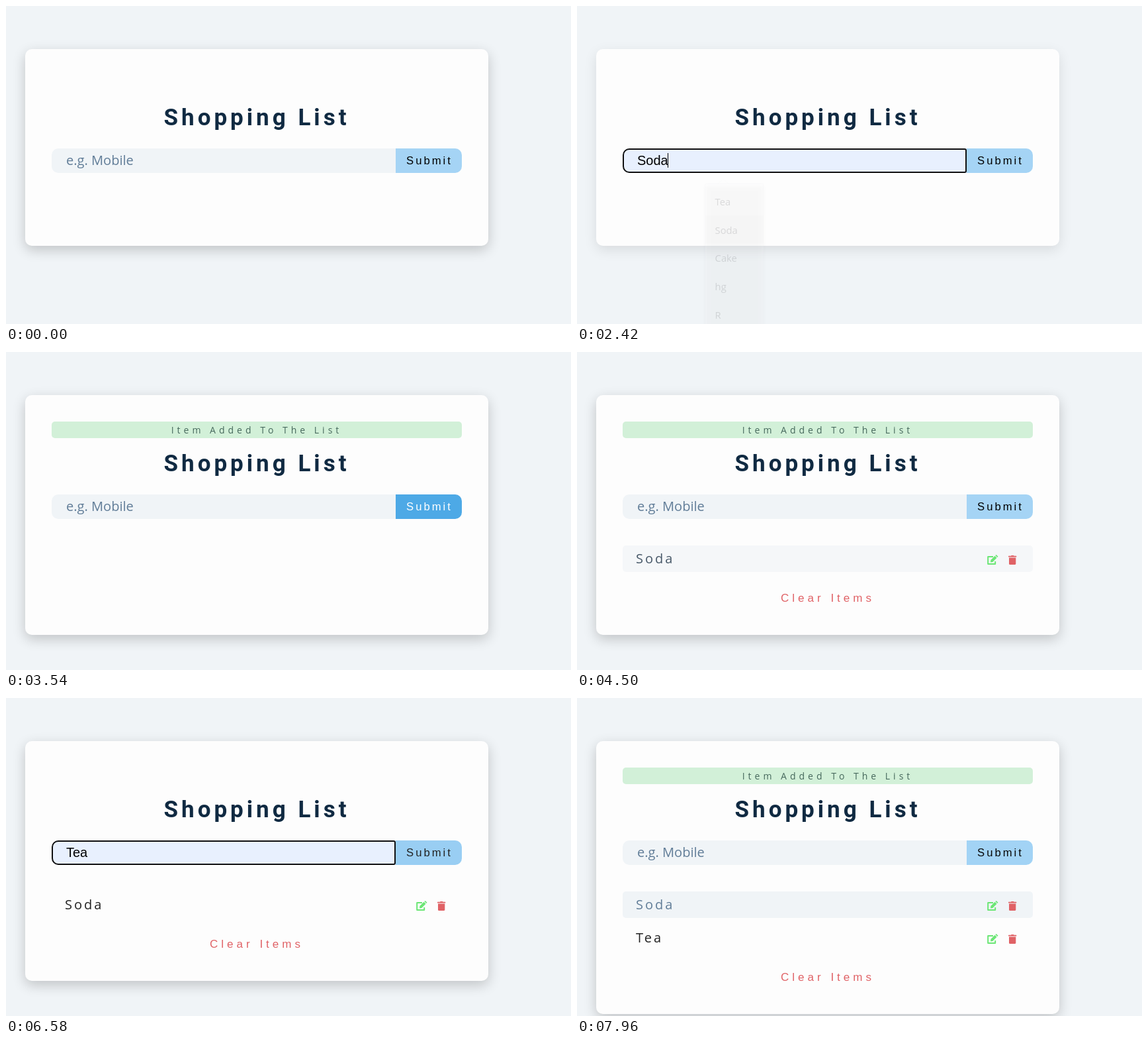
Write an HTML page with a canvas that moves like this. It is 854x480 px and loops after 8 s.

```html
<!DOCTYPE html>
<html lang="en">
<head>
<meta charset="utf-8">
<title>Shopping List</title>
<style>
  html, body { margin: 0; width: 100%; height: 100%; overflow: hidden; background: #f0f4f7; }
  canvas { display: block; width: 854px; height: 480px; }
</style>
</head>
<body>
<canvas id="stage" width="854" height="480"></canvas>
<script>
const ctx = document.getElementById('stage').getContext('2d');
const LOOP = 8000;
const OPEN = '"Open Sans", "Noto Sans", sans-serif';
const ARIAL = '"Liberation Sans", Arial, sans-serif';
const MID = 379;
const PALE = '#f0f4f7', WHITE = '#fdfdfd', INK = '#102a42', RED = '#e06266', GREEN = '#6be675';

// One entry per use of the input field
const rounds = [
  { focus: 460, open: 710, picks: [[1250, 0], [1670, 1]], pick: 2000, close: 2290, blur: 3440, submit: 3540 },
  { focus: 4790, open: 4920, picks: [[5330, 0]], pick: 5790, close: 6080, blur: 7000, submit: 7210 }
];
const options = ['Tea', 'Soda', 'Cake', 'hg', 'R'];

const clamp = v => Math.max(0, Math.min(1, v));
const ramp = (t, from, span) => clamp((t - from) / span);
const within = (t, a, b) => t >= a && t < b;
const mix = (a, b, p) => `rgb(${a.map((v, i) => Math.round(v + (b[i] - v) * p))})`;

// Linear hover transition that flips at each of the given times
function hover(t, start, flips, span = 300) {
  return flips.reduce((value, at, i) => {
    if (t < at) return value;
    const p = ramp(t, at, span);
    return (start + i) % 2 ? 1 - p : p;
  }, start);
}

function box(x, y, w, h, r, fill) {
  ctx.beginPath();
  ctx.roundRect(x, y, w, h, r);
  ctx.fillStyle = fill;
  ctx.fill();
}

function text(str, x, y, font, color, spacing = 0, align = 'left') {
  ctx.font = font;
  ctx.letterSpacing = spacing + 'px';
  ctx.textAlign = align;
  ctx.fillStyle = color;
  ctx.fillText(str, x, y);
}

function shadow(color, blur, dy) {
  ctx.shadowColor = color;
  ctx.shadowBlur = blur;
  ctx.shadowOffsetY = dy;
}

function poly(points, fill) {
  ctx.beginPath();
  points.forEach(([x, y]) => ctx.lineTo(x, y));
  ctx.closePath();
  ctx.fillStyle = fill;
  ctx.fill();
}

function drawCard(bottom, hovered) {
  ctx.save();
  shadow(`rgba(0,0,0,${0.1 + 0.1 * hovered})`, 18.75, 6.25);
  box(29, 65, 700, bottom - 65, 10, WHITE);
  ctx.restore();
  text('Shopping List', MID, 180, 'bold 35px Roboto, sans-serif', INK, 5, 'center');
}

function drawAlert() {
  box(69, 105, 620, 25, 5, '#d2f0d8');
  text('Item Added To The List', MID, 122.7, '14px ' + OPEN, '#46685c', 5, 'center');
}

function drawInput(t, round) {
  const pick = round && round.picks.filter(p => t >= p[0]).pop();
  const focused = round && t < round.blur;
  box(69, 215, 520, 37, [10, 0, 0, 10], pick ? '#e8f0fe' : PALE);
  if (focused) {
    ctx.beginPath();
    ctx.roundRect(70, 216, 518, 35, [9, 2, 2, 9]);
    ctx.strokeStyle = '#101010';
    ctx.lineWidth = 2;
    ctx.stroke();
  }
  const picked = round && t >= round.pick;
  let caret = 91;
  if (pick) {
    const size = picked ? 20 : 16.67;
    text(options[pick[1]], 91, 240, size + 'px ' + ARIAL, '#000');
    caret += Math.floor(ctx.measureText(options[pick[1]]).width);
  } else {
    text('e.g. Mobile', 91, 240, '20px ' + OPEN, '#617d98');
  }
  // The caret rests while an option is only previewed
  const since = focused && (picked ? t - round.pick : pick ? -1 : t - round.focus);
  if (focused && since >= 0 && since % 1100 < 550) {
    ctx.fillStyle = '#000';
    ctx.fillRect(caret, 222, 1, 22);
  }
}

function drawSubmit(p) {
  box(589, 215, 100, 37, [0, 10, 10, 0], mix([165, 212, 245], [77, 169, 230], p));
  text('Submit', 640, 239, '16.67px ' + ARIAL, mix([0, 0, 0], [255, 255, 255], p), 3, 'center');
}

function drawEdit(x, y) {
  ctx.strokeStyle = GREEN;
  ctx.lineWidth = 2;
  ctx.lineJoin = 'round';
  ctx.beginPath();
  ctx.moveTo(x + 9, y + 3);
  ctx.lineTo(x + 1.2, y + 3);
  ctx.lineTo(x + 1.2, y + 14);
  ctx.lineTo(x + 12.2, y + 14);
  ctx.lineTo(x + 12.2, y + 10);
  ctx.stroke();
  poly([[x + 5, y + 11.5], [x + 5.4, y + 8], [x + 11.6, y + 1.8], [x + 14.5, y + 4.7], [x + 8.3, y + 11]], GREEN);
  poly([[x + 12.3, y + 1.1], [x + 13.8, y], [x + 16.5, y + 2.7], [x + 15.2, y + 4]], GREEN);
}

function drawTrash(x, y) {
  box(x + 4, y, 4.5, 2, 1, RED);
  box(x, y + 0.8, 12.3, 1.8, 0.6, RED);
  box(x + 1, y + 3.4, 10.3, 10.6, [0, 0, 1.6, 1.6], RED);
}

function drawItem(name, y, p) {
  if (p > 0) {
    ctx.globalAlpha = p;
    box(69, y, 620, 40, 5, PALE);
    ctx.globalAlpha = 1;
  }
  text(name, 89, y + 27, '20px ' + OPEN, mix([34, 34, 34], [97, 125, 152], p), 3);
  drawEdit(620, y + 14);
  drawTrash(652, y + 15);
}

function drawMenu(t, round) {
  const out = ramp(t, round.close, 150);
  const shown = ramp(t, round.open - 40, 80) * (1 - out);
  if (shown <= 0) return;
  const scale = 1 - 0.06 * (1 - shown);
  const pick = round.picks.filter(p => t >= p[0]).pop();
  ctx.save();
  ctx.globalAlpha = shown;
  ctx.translate(238, 390);
  ctx.scale(scale, scale);
  ctx.translate(-238, -390);
  ctx.save();
  shadow('rgba(0,0,0,.2)', 6, 2);
  box(191.5, 262, 92.5, 256, 2, WHITE);
  ctx.restore();
  ctx.strokeStyle = '#e8eaec';
  ctx.lineWidth = 1;
  ctx.strokeRect(191.5, 261.5, 92.5, 257);
  poly([[211, 263], [220, 254.5], [229, 263]], WHITE);
  ctx.beginPath();
  ctx.moveTo(211, 262);
  ctx.lineTo(220, 254);
  ctx.lineTo(229, 262);
  ctx.stroke();
  options.forEach((name, i) => {
    const y = 267 + 45 * i;
    if (pick && pick[1] === i) box(191.5, y, 92.5, 45, 0, '#e8e8ea');
    text(name, 207, y + 29, '15.5px ' + OPEN, '#202124');
  });
  ctx.restore();
}

function draw(t) {
  const round = rounds.find(r => within(t, r.focus, r.submit));
  const [first, second] = rounds;
  const bottom = t < first.submit ? 362 : t < second.submit ? 427 : 477;

  ctx.fillStyle = PALE;
  ctx.fillRect(0, 0, 854, 480);
  drawCard(bottom, hover(t, 1, [1250, 2450, 5330, 6120]));
  if (rounds.some(r => within(t, r.submit, r.submit + 1000))) drawAlert();
  drawInput(t, round);
  drawSubmit(hover(t, 0, [2960, 4170, 6540, 7670]));

  if (t >= 3710) {
    drawItem('Soda', 292, hover(t, 0, [4180, 4420, 7740], 200));
    if (t >= second.submit) drawItem('Tea', 342, 0);
    text('Clear Items', MID, bottom - 50, '17px ' + ARIAL, RED, 5, 'center');
  }
  if (round) drawMenu(t, round);
}

let start;
function tick(now) {
  start ??= now;
  draw((now - start) % LOOP);
  requestAnimationFrame(tick);
}
requestAnimationFrame(tick);
</script>
</body>
</html>
```
